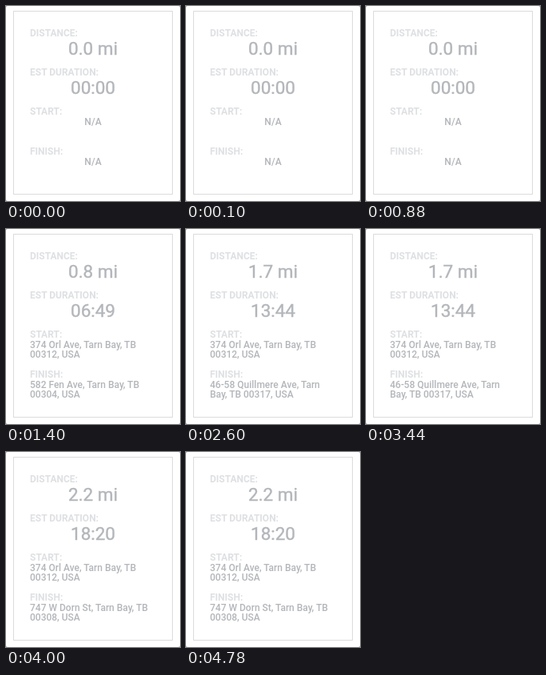
An HTML page for the animation above (5300 ms loop, 218 px wide and 244 px high).

```html
<!DOCTYPE html>
<html lang="en">
<head>
<meta charset="utf-8">
<title>Trip summary</title>
<style>
  html, body { margin: 0; width: 100%; height: 100%; overflow: hidden; background: #a4a5a7; }
  svg { display: block; width: 218px; height: 244px; }
  text { font: 500 12px Roboto, sans-serif; fill: #b3b6ba; white-space: pre; }
  .label { font-weight: 700; fill: #dee0e3; }
  .value { font-size: 22.5px; font-weight: 400; text-anchor: middle; stroke: #b3b6ba; stroke-width: .4px; }
  .empty { text-anchor: middle; }
</style>
</head>
<body>
<svg viewBox="0 0 218 244">
  <rect width="218" height="244" rx="2" fill="#fff"/>
  <rect x="9.5" y="6.5" width="199" height="229" fill="none" stroke="#dcdcde"/>
  <text class="label" x="30" y="38">DISTANCE:</text>
  <text class="label" x="30" y="87">EST DURATION:</text>
  <text class="label" x="30" y="136">START:</text>
  <text class="label" x="30" y="186">FINISH:</text>
  <text class="value" id="distance" x="109" y="61"></text>
  <text class="value" id="duration" x="109" y="110"></text>
  <g id="start"></g>
  <g id="finish"></g>
</svg>
<script>
  const LOOP = 5300;
  const LINE = 12;
  const home = ["374 Orl Ave, Tarn Bay, TB", "00312, USA"];
  const steps = [
    { at: 0, distance: "0.0 mi", duration: "00:00", start: [], finish: [] },
    { at: 1400, distance: "0.8 mi", duration: "06:49", start: home,
      finish: ["582 Fen Ave, Tarn Bay, TB", "00304, USA"] },
    { at: 2600, distance: "1.7 mi", duration: "13:44", start: home,
      finish: ["46-58 Quillmere Ave, Tarn", "Bay, TB 00317, USA"] },
    { at: 4000, distance: "2.2 mi", duration: "18:20", start: home,
      finish: ["747 W Dorn St, Tarn Bay, TB", "00308, USA"] }
  ];

  const el = id => document.getElementById(id);

  function addText(parent, str, x, y, cls) {
    const t = document.createElementNS("http://www.w3.org/2000/svg", "text");
    t.setAttribute("x", x);
    t.setAttribute("y", y);
    if (cls) t.setAttribute("class", cls);
    t.textContent = str;
    parent.append(t);
  }

  function showAddress(id, lines, y) {
    const group = el(id);
    group.replaceChildren();
    if (!lines.length) addText(group, "N/A", 109, y, "empty");
    lines.forEach((line, i) => addText(group, line, 30, y + i * LINE));
  }

  let shown = null;
  function show(step) {
    if (step === shown) return;
    shown = step;
    el("distance").textContent = step.distance;
    el("duration").textContent = step.duration;
    showAddress("start", step.start, 149);
    showAddress("finish", step.finish, 199);
  }

  const began = performance.now();
  function tick() {
    const t = (performance.now() - began) % LOOP;
    show(steps.filter(s => s.at <= t).pop());
    requestAnimationFrame(tick);
  }
  tick();
</script>
</body>
</html>
```
